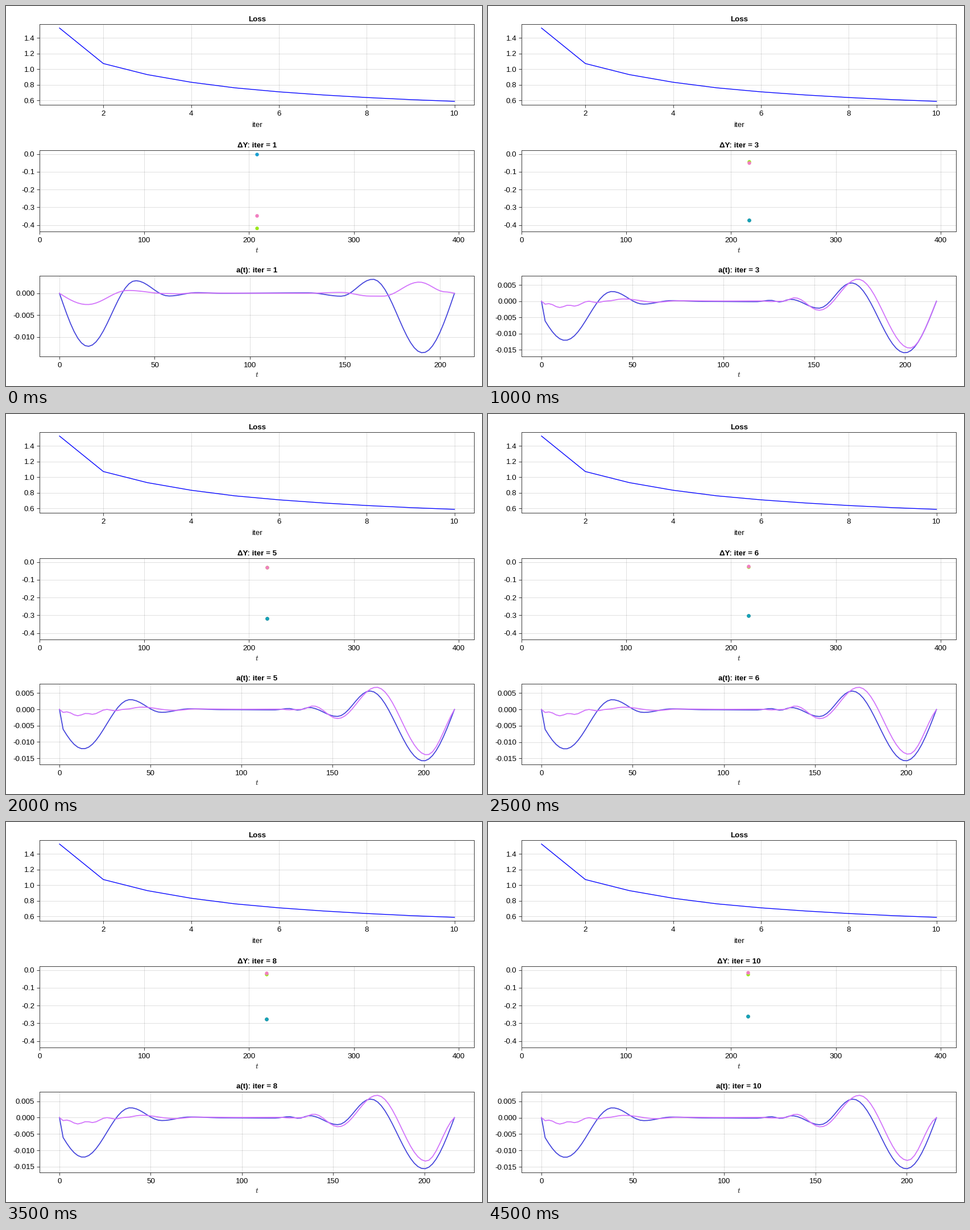
A matplotlib script for the animation above (5000 ms loop, 837x669 px).

```python
import numpy as np
import matplotlib.pyplot as plt
from matplotlib.animation import FuncAnimation

W, H, DPI = 837, 669, 64
LEFT, RIGHT = 59.3, 823.3
PX = 72 / DPI
TEXT = 13.33 * PX
INK = "#3c3c3c"
ITERS = 10
SAMPLES = 109

plt.rcParams.update({
    "font.family": "Liberation Sans",
    "font.size": TEXT,
    "mathtext.fontset": "cm",
    "axes.linewidth": 1 * PX,
    "axes.edgecolor": INK,
})

LOSS = [1.529, 1.073, 0.931, 0.833, 0.761, 0.710, 0.670, 0.637, 0.610, 0.588]

# turning points (time, thousandths) of the two controls
FIRST_BLUE = [(15, -12.1), (40, 2.87), (57.5, -.62), (72, .15), (85, 0),
              (131, .1), (148, -.66), (164.6, 3.2), (190.8, -13.57)]
FIRST_PINK = [(14.6, -2.57), (36, .65), (56, -.06), (63, -.12), (69, .05),
              (130, 0), (148, .2), (163, -.64), (170, -.65), (189, 2.55), (203, .3)]
LATER_BLUE = [(13, -12.1), (38.8, 3), (56, -.9), (71.5, .18), (90, -.08), (118, -.15),
              (126, .27), (131, -.23), (137, .58), (152.5, -2.16), (170.5, 5.65)]
LATER_PINK = [(2, -.92), (4, -.75), (10, -1.95), (15, -1.2), (18, -1.52), (26, 0),
              (30.3, -.42), (36, .07), (45, .7), (63, -.3), (75, .14), (101, .05),
              (121, .08), (126, -.12), (133, 0), (139.3, 1.05), (152.8, -2.8), (174, 6.8)]


def progress(k):
    """Ease-out from the second iteration (0) to the last (1)."""
    return 1 - (1 - max(k - 1, 0) / (ITERS - 2)) ** 1.4


def duration(k):
    return 207.5 if k == 0 else 217.45 - 1.2 * progress(k)


def decay(k, first, second, floor, rate):
    return first if k == 0 else floor + (second - floor) * rate ** (k - 1)


def swing(t, keys, start=0, soft=0):
    """Cosine easing between turning points, with quarter waves at both ends."""
    x, y = np.array([(0, start), *keys, (t[-1], 0)]).T
    i = np.clip(np.searchsorted(x, t, side="right") - 1, 0, len(x) - 2)
    u = (t - x[i]) / (x[i + 1] - x[i])
    half = (1 - np.cos(np.pi * u)) / 2
    leave = np.sin(np.pi / 2 * u)
    arrive = soft * half + (1 - soft) * (1 - np.cos(np.pi / 2 * u))
    s = np.where(i == 0, leave, np.where(i == len(x) - 2, arrive, half))
    v = y[i] + (y[i + 1] - y[i]) * s
    v[0] = v[-1] = 0
    return v / 1000


def controls(k, t):
    if k == 0:
        return swing(t, FIRST_BLUE), swing(t, FIRST_PINK)
    w = progress(k)
    blue = LATER_BLUE + [(200 - .3 * w, -16.02 + .44 * w)]
    pink = LATER_PINK + [(203 - 2.5 * w, -14.8 + 1.75 * w)]
    return swing(t, blue, start=-4.2), swing(t, pink, soft=.75 * w)


def padded(lo, hi):
    pad = 0.05 * (hi - lo)
    return lo - pad, hi + pad


def set_ticks(ax, xs, ys, digits):
    ax.set_xticks(xs, [str(x) for x in xs])
    ax.set_yticks(ys, [f"{y:.{digits}f}" for y in ys])


def set_title(ax, text):
    ax.set_title(text, fontsize=TEXT, fontweight="bold", pad=5.4 * PX)


def panel(top, bottom, xlabel, drop):
    ax = fig.add_axes([LEFT / W, 1 - bottom / H, (RIGHT - LEFT) / W, (bottom - top) / H])
    ax.grid(color="black", alpha=0.12, linewidth=1 * PX)
    ax.set_axisbelow(True)
    ax.tick_params(length=5 * PX, width=1 * PX, color=INK)
    ax.tick_params(axis="x", pad=5 * PX)
    ax.tick_params(axis="y", pad=4 * PX)
    ax.annotate(xlabel, (0.5, 0), xycoords="axes fraction", xytext=(0, -drop * PX),
                textcoords="offset points", ha="center", va="baseline")
    return ax


def dot(color, size=6.4):
    return err_ax.plot([], [], "o", ms=size * PX, mfc=color, mec="none", snap=False)[0]


fig = plt.figure(figsize=(W / DPI, H / DPI), dpi=DPI, facecolor="white")

loss_ax = panel(32.3, 174.3, "iter", 38.4)
loss_ax.plot(range(1, ITERS + 1), LOSS, color="#0000ff", lw=1.35 * PX)
loss_ax.set_xlim(padded(1, ITERS))
loss_ax.set_ylim(padded(min(LOSS), max(LOSS)))
set_ticks(loss_ax, range(2, 11, 2), [n / 10 for n in range(6, 15, 2)], 1)
set_title(loss_ax, "Loss")

err_ax = panel(254.3, 397.3, "$t$", 36.5)
err_ax.set_xlim(0, 2 * duration(0))
err_ax.set_ylim(padded(-0.417, 0))
set_ticks(err_ax, range(0, 401, 100), [n / 10 for n in range(-4, 1)], 1)
rim, teal = dot("#5f7f86", 6.7), dot("#14a3b8")
green, pink_dot = dot("#9be81c"), dot("#f17fc0")

ctl_ax = panel(474.8, 616.8, "$t$", 36.5)
blue_line, = ctl_ax.plot([], [], color="#4545dc", lw=1.75 * PX)
pink_line, = ctl_ax.plot([], [], color="#d273fb", lw=1.75 * PX)


def update(k):
    end = duration(k)
    low = decay(k, 0, -.413, -.24, .77)
    rim.set_data([end], [low])
    rim.set_visible(k > 0)
    teal.set_data([end], [low])
    teal.set_markerfacecolor("#14a3b8" if k else "#1a9ed0")
    green.set_data([end], [decay(k, -.417, -.0546, -.021, .6)])
    pink_dot.set_data([end], [decay(k, -.3466, -.0674, -.009, .7)])
    set_title(err_ax, f"ΔY: iter = {k + 1}")

    t = np.linspace(0, end, SAMPLES)
    blue, pink = controls(k, t)
    blue_line.set_data(t, blue)
    pink_line.set_data(t, pink)
    both = np.concatenate([blue, pink])
    lo, hi = padded(both.min(), both.max())
    step = 0.005
    marks = range(int(np.ceil(lo / step)), int(np.floor(hi / step)) + 1)
    set_ticks(ctl_ax, range(0, 201, 50), [n * step for n in marks], 3)
    ctl_ax.set_xlim(padded(0, end))
    ctl_ax.set_ylim(lo, hi)
    set_title(ctl_ax, f"a(t): iter = {k + 1}")
    return []


anim = FuncAnimation(fig, update, frames=ITERS, interval=500, repeat=True,
                     repeat_delay=0, blit=False, init_func=lambda: update(0))
plt.show()
```
